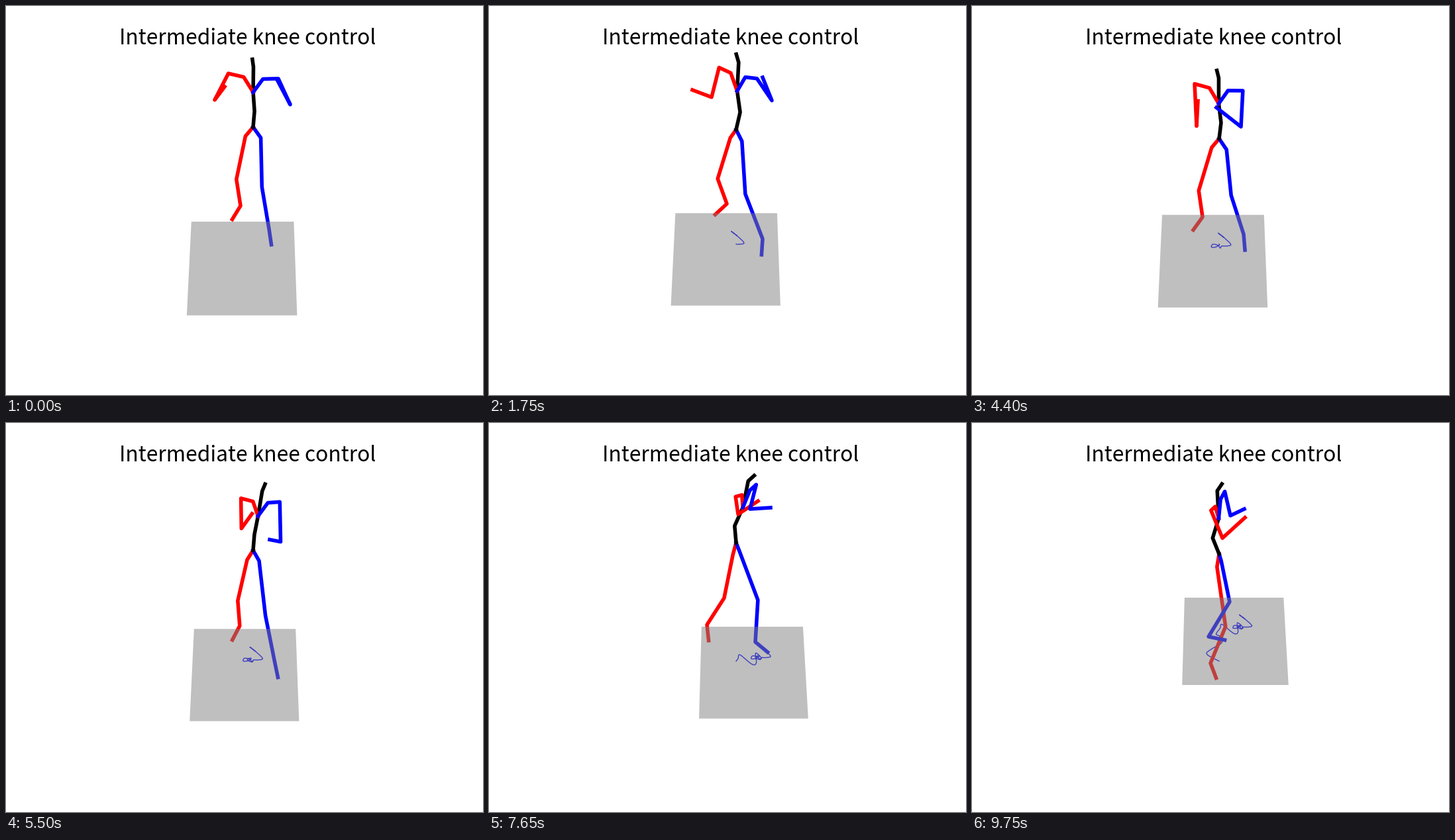
Animation of 720x588 px, one loop 9800 ms. Source, as a matplotlib script:

```python
import numpy as np
import matplotlib.pyplot as plt
from matplotlib.animation import FuncAnimation

W, H, DPI = 720, 588, 100
FRAMES, STEP = 196, 50
KEYS = np.array([0, 35, 55, 88, 132, 153, 195])
t = np.arange(FRAMES)


def glide(values, keys=KEYS):
    """Pass smoothly through the key values, one result per frame."""
    v = np.asarray(values, float)
    v = v.reshape(len(v), -1)
    m = np.gradient(v, keys, axis=0)
    i = np.clip(np.searchsorted(keys, t, side="right") - 1, 0, len(keys) - 2)
    h = np.diff(keys)[i, None]
    s = (t - keys[i])[:, None] / h
    rise = s * s * (3 - 2 * s)
    return (v[i] + rise * (v[i + 1] - v[i])
            + h * s * (1 - s) * ((1 - s) * m[i] - s * m[i + 1]))


def vec(x, y):
    return np.stack(np.broadcast_arrays(x, y), axis=-1)


# Ground perspective: vanishing point far above the stage.
VX, VY, REACH = 370, -1520, 1880


def to_ground(p):
    u = REACH / (p[..., 1] - VY)
    return vec((p[..., 0] - VX) * u, u)


def to_screen(g):
    return vec(VX + g[..., 0] / g[..., 1], VY + REACH / g[..., 1])


# Walked path at even times, as seen from the final position.
path = [
    (411.6, 295.8), (403.5, 290), (414, 298), (422.5, 306.5), (416, 308.5),
    (409, 308.5), (407, 311.5), (403.5, 307.5), (396, 306), (394, 310),
    (400, 310), (405.5, 307), (404.5, 305.8), (400, 308), (405, 311),
    (409, 309), (400.5, 302), (401.5, 316), (395, 318), (377.5, 304.5),
    (374.5, 310), (368.5, 319), (374, 322.5), (377, 332), (361, 342),
    (354.5, 349.5), (373, 360),
]
walk_px = glide(path, np.linspace(0, FRAMES - 1, len(path)))
walk = to_ground(walk_px)
left, right, near, far = -51.8, 105.7, 0.9812, 1.0538
floor = np.array([(left, far), (right, far), (right, near), (left, near)])

# The body rises between poses; the feet drift with the floor.
rise = sum(a * np.exp(-((t - c) / w) ** 2) for c, a, w in
           [(29, 6, 3), (105, 11, 12)])
drift = glide(walk_px[KEYS]) - walk_px

# Spine: pelvis height, overall stretch, and lean of two bones in degrees.
pelvis = vec(373, glide([183, 187, 200, 202, 196, 181, 198])[:, 0] - rise)
stretch = glide([0.96, 1.08, 1.04, 0.97, 0.97, 1.02, 1.04])
waist = glide([5, 13, 4, 7, 0, -5, -22])
back = glide([-4, -8, -9, -7, 27, 24, 17])


def bone(length, angle):
    a = np.radians(angle[:, 0])
    return length * stretch * vec(np.sin(a), -np.cos(a))


belly = pelvis + bone(25, waist)
chest = belly + bone(30, back)
neck = chest + bone(40, 0.6 * (waist + back))
head = neck + bone(12, 2 * back)

# Half the shoulder line; its tilt tells which way the body faces.
half = glide([(14.5, 1.5), (11, 3.2), (14, 0.5), (14, 2), (8, -1),
              (6, -3.5), (4, -5.5)])
facing = -4 * half[:, 1]


def leg(side, ankles, knee_at):
    ankle = glide(ankles) + drift
    hip = pelvis + (0, 15) + side * 0.8 * half
    knee = hip + knee_at * (ankle - hip) + vec(facing + 2 * side - 1, 0)
    toe = 8 * side + 0.75 * facing
    foot = vec(toe, np.sqrt(np.maximum(24 ** 2 - toe ** 2, 25)))
    return [pelvis, hip, knee, ankle, ankle + foot]


def arm(side, elbows, wrists):
    lift = vec(0, rise)
    collar = chest + 0.56 * (neck - chest) + side * half
    shoulder = collar + side * 1.6 * half - (0, 3)
    return [chest, collar, shoulder, glide(elbows) - lift,
            glide(wrists) - lift]


limbs = [
    ("red", leg(-1, [(354, 302), (359, 299), (331, 320), (348, 319),
                     (350, 293), (329, 305), (360, 363)], 0.62)),
    ("blue", leg(1, [(397, 337), (413, 352), (426, 352), (410, 345),
                     (406, 361), (402, 331), (357, 323)], 0.54)),
    ("black", [pelvis, belly, chest, neck, head]),
    ("red", arm(-1, [(315, 142), (336, 138), (338, 170), (339, 183),
                     (372, 149), (376, 138), (378, 174)],
                [(330, 122), (307, 127), (337, 129), (341, 145),
                 (401, 138), (406, 118), (412, 143)])),
    ("blue", arm(1, [(429, 149), (427, 143), (404, 169), (406, 184),
                     (415, 175), (394, 130), (390, 140)],
                 [(410, 113), (413, 108), (395, 124), (369, 155),
                  (429, 188), (425, 128), (411, 130)])),
]

fig = plt.figure(figsize=(W / DPI, H / DPI), dpi=DPI, facecolor="white")
ax = fig.add_axes([0, 0, 1, 1])
ax.set(xlim=(0, W), ylim=(H, 0))
ax.axis("off")
ax.text(364.5, 58.5, "Intermediate knee control", ha="center",
        va="baseline", fontsize=22.9, family="Noto Sans CJK JP",
        weight="light")

trail, = ax.plot([], [], color="blue", lw=1, zorder=2)
lines = [ax.plot([], [], color=c, lw=4, solid_capstyle="projecting",
                 solid_joinstyle="round", zorder=3)[0] for c, _ in limbs]
ground, = ax.fill([0, 1, 1], [0, 0, 1], color=(0.5, 0.5, 0.5, 0.5), lw=0,
                  zorder=4)


def draw(n):
    shift = walk[-1] - walk[n]
    ground.set_xy(to_screen(floor + shift))
    trail.set_data(*to_screen(walk[:n + 1] + shift).T)
    for line, (_, joints) in zip(lines, limbs):
        line.set_data(*np.array([j[n] for j in joints]).T)
    return [ground, trail, *lines]


anim = FuncAnimation(fig, draw, frames=FRAMES, interval=STEP, repeat=True)
plt.show()
```
